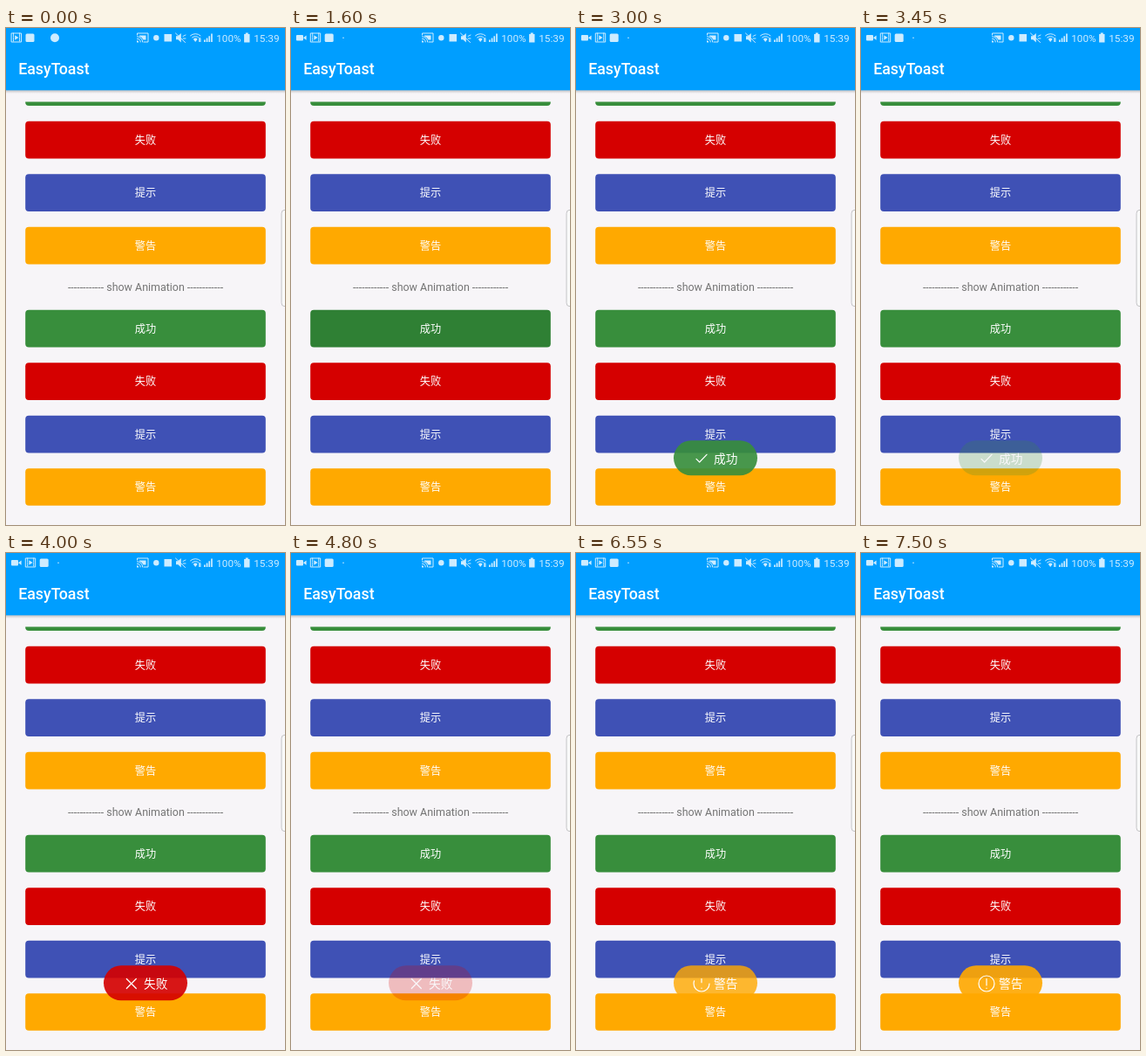
Recreate the animation shown at these times as an HTML page. Size 320x569 px, loop 7.55 s.

```html
<!DOCTYPE html>
<html lang="zh-CN">
<head>
<meta charset="utf-8">
<title>EasyToast</title>
<style>
  html, body { margin: 0; width: 100%; height: 100%; overflow: hidden; background: #f7f5f8; }
  svg { display: block; width: 100%; height: 100%; }
  text { font-family: Roboto, "Noto Sans CJK SC", "Noto Sans CJK", sans-serif; }
  .line { fill: none; stroke: #fff; stroke-width: 1.2; stroke-linecap: round; stroke-linejoin: round; }
  .status { fill: #cdecff; }
  .status .line { stroke: #cdecff; stroke-width: 1; }
</style>
</head>
<body>
<svg viewBox="0 0 320 569" xmlns="http://www.w3.org/2000/svg">
  <defs>
    <linearGradient id="shade" x2="0" y2="1">
      <stop stop-color="#000" stop-opacity=".22"/>
      <stop offset="1" stop-color="#000" stop-opacity="0"/>
    </linearGradient>
    <clipPath id="list"><rect y="84.5" width="320" height="485"/></clipPath>
  </defs>
  <rect width="320" height="569" fill="#f7f5f8"/>
  <g id="buttons" clip-path="url(#list)"></g>
  <text x="160" y="301.3" font-size="12.45" fill="#757575" text-anchor="middle">------------ show Animation ------------</text>

  <rect y="71" width="320" height="4" fill="url(#shade)"/>
  <rect width="320" height="71.3" fill="#009eff"/>
  <text x="14.2" y="53.3" font-size="17.8" font-weight="500" fill="#fff">EasyToast</text>

  <g class="status">
    <g id="camera"><rect x="6" y="8" width="8" height="6.5" rx="1"/><path d="M14 11.2l3.6-2.6v5.2z"/></g>
    <g id="notices">
      <rect class="line" x="6.5" y="6" width="11" height="10"/>
      <path class="line" d="M8.5 6v10M15.5 6v10" stroke-dasharray="1.5 1"/>
      <path d="M10.2 8.2v5.6l4.2-2.8z"/>
      <rect x="22.5" y="6.5" width="10" height="9.5" rx="1.5"/>
    </g>
    <circle id="badge" cx="56" cy="11.3"/>

    <path class="line" d="M150.5 8V6h12.500v10h-5M150.500 9.800a6.200 6.200 0 0 1 6.200 6.200M150.500 12.300a3.700 3.700 0 0 1 3.700 3.700"/>
    <path d="M150 14.300a2.200 2.200 0 0 1 2.200 2.200H150z"/>
    <path d="M153 8.500h7.500v5h-3a8 8 0 0 0-4.500-4z"/>
    <circle cx="172.300" cy="11.200" r="3.200"/>
    <rect x="181.500" y="7" width="8.500" height="8.500"/>
    <path d="M195 9.200h2.300l3.500-3.200v10.500l-3.500-3.300H195z"/>
    <path class="line" d="M194.500 6l11 10.500M203 9.500l3-1.500M203 12h3"/>
    <path class="line" d="M211.500 8.800a8.500 8.500 0 0 1 11.500 0M213.500 11a5.500 5.500 0 0 1 7.500 0"/>
    <path d="M214.800 12.700a3.500 3.500 0 0 1 4.900 0L217.200 16z"/>
    <path d="M221 16v-4l1.300-1.500 1.300 1.500v4z" opacity=".8"/>
    <path d="M227 16v-2.500h1.700V16zM229.700 16v-4.500h1.700V16zM232.400 16V9.200h1.700V16zM235.100 16V6.500h1.700V16z"/>
    <text x="241.300" y="15.600" font-size="11.700">100%</text>
    <path d="M274.800 5.500h3V7h1.700v9.500h-6.400V7h1.700z"/>
    <text x="284.200" y="15.600" font-size="11.800">15:39</text>
  </g>

  <path d="M321 208.500h-2q-3 0-3 4v102q0 4 3 4h2z" fill="#fafafa" stroke="#b5b5b8" stroke-width=".8"/>
  <g id="toasts"></g>
</svg>
<script>
const LOOP = 7550, STEP = 50;
const ring = "M153 493a9 9 0 1 1-18 0a9 9 0 1 1 18 0";
const kinds = [
  { label: "成功", color: "#388e3c", dark: "#2f8034", press: 1600, done: 2250,
    strokes: ["M138 493.300l3.700 3.700L150 488.300"] },
  { label: "失败", color: "#d50000", dark: "#bd0000", press: 3200, done: 3900,
    strokes: ["M138.300 487.500l11 11", "M149.300 487.500l-11 11"] },
  { label: "提示", color: "#3f51b5", dark: "#3748a3", press: 4550, done: 5300,
    strokes: [ring, "M144 491v7.500", "M144 487.700v.2"] },
  { label: "警告", color: "#ffa900", dark: "#e89a00", press: 6000, done: 6750,
    strokes: [ring, "M144 487.500v7.500", "M144 498.200v.2"] },
];
const byId = id => document.getElementById(id);

function add(parent, tag, attributes, content = "") {
  const node = document.createElementNS("http://www.w3.org/2000/svg", tag);
  for (const key in attributes) node.setAttribute(key, attributes[key]);
  node.textContent = content;
  return parent.appendChild(node);
}

function addButton(kind, y) {
  const face = add(byId("buttons"), "rect", { x: 22.2, y, width: 275.6, height: 42.7, rx: 4, fill: kind.color });
  add(byId("buttons"), "text", { x: 160, y: y + 26, "font-size": 12.2, fill: "#fff", "text-anchor": "middle" }, kind.label);
  return face;
}

kinds.forEach((kind, i) => {
  addButton(kind, 46.4 + i * 60.45);
  kind.face = addButton(kind, 322.8 + i * 60.45);
  kind.toast = add(byId("toasts"), "g", {});
  add(kind.toast, "rect", { x: 112, y: 472.3, width: 96, height: 40, rx: 20, fill: kind.color, "fill-opacity": .91 });
  add(kind.toast, "text", { x: 158, y: 497.6, "font-size": 13.7, fill: "#fff" }, kind.label);
  kind.lines = kind.strokes.map(d => add(kind.toast, "path", { d, class: "line", pathLength: 1 }));
});

const progress = (t, from, to) => Math.min(1, Math.max(0, (t - from) / (to - from)));
const easeOut = p => 1 - (1 - p) ** 2;

function drawStatus(t) {
  const p = easeOut(progress(t, 0, 350));
  byId("camera").setAttribute("opacity", p);
  byId("notices").setAttribute("transform", `translate(${16.2 * p} 0)`);
  byId("badge").setAttribute("cx", 56 + 4 * p);
  byId("badge").setAttribute("r", 5 - 4.2 * p);
}

function draw(t) {
  drawStatus(t);
  kinds.forEach((kind, i) => {
    const pressed = t >= kind.press && t < kind.press + 200;
    kind.face.setAttribute("fill", pressed ? kind.dark : kind.color);

    const next = kinds[i + 1];
    const shown = easeOut(progress(t, kind.done - 400, kind.done - 100));
    const hidden = next ? progress(t, next.press + 100, next.press + 300) : 0;
    kind.toast.setAttribute("opacity", shown * (1 - hidden));

    const drawn = progress(t, kind.done - 450, kind.done);
    const share = kind.label === "失败" ? 2 : 1;
    kind.lines.forEach((line, n) => {
      // The cross is drawn one stroke after the other.
      const part = share === 2 ? progress(drawn, n / 2, (n + 1) / 2) : drawn;
      line.setAttribute("stroke-dasharray", part < 1 ? `${part} 2` : "none");
      line.setAttribute("visibility", part > 0 ? "visible" : "hidden");
    });
  });
}

const start = performance.now();
function frame() {
  const t = (performance.now() - start) % LOOP;
  draw(Math.floor(t / STEP) * STEP);
  requestAnimationFrame(frame);
}
frame();
</script>
</body>
</html>
```
